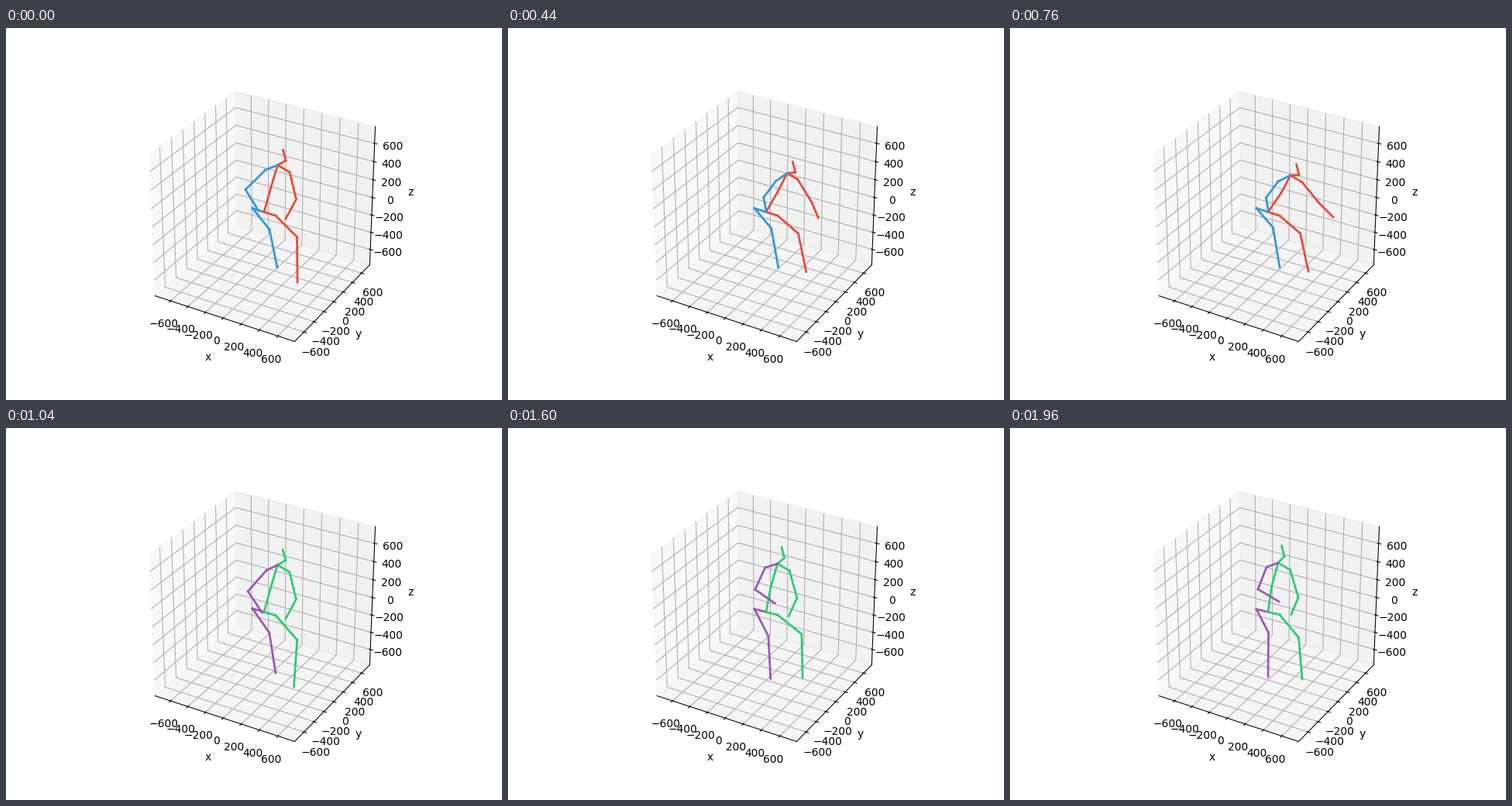
A matplotlib script that plays this animation: 640x480 px, repeating every 2000 ms.

```python
import numpy as np
import matplotlib.pyplot as plt
from matplotlib.animation import FuncAnimation

FRAMES, STEP = 50, 0.04          # frames per loop, seconds per frame
SWITCH = 1.0                     # second at which the predicted motion begins
REACH = 750                      # half width of the scene in mm
MM = 7.508                       # mm per stage pixel in the plane of the hip
HIP = np.array([333.0, 237.4])
HEAD = np.array([-3.5, -13.5])   # head as seen from the neck

plt.rcParams["axes.linewidth"] = 0.75

# Key poses as seen by the camera: hip, knee, foot / chest, neck / shoulder, elbow, wrist.
UPRIGHT = {
    "r_leg": [(318, 232.6), (340, 260), (350, 309)],
    "l_leg": [(375.5, 269.5), (376, 328)],
    "torso": [(350.5, 177), (361, 171)],
    "l_arm": [(366, 186), (374.5, 221), (361, 246)],
    "r_arm": [(335, 183), (309, 208.5), (326, 236)],
}
LEANING = {
    "r_leg": [(318, 232.6), (339.5, 257.5), (348, 309)],
    "l_leg": [(374.5, 265), (385, 314)],
    "torso": [(362, 190), (373, 189.5)],
    "l_arm": [(377, 199), (399, 226), (417, 244)],
    "r_arm": [(346, 198), (330.5, 219), (333.5, 237)],
}
STRIDING = {
    **UPRIGHT,
    "r_leg": [(318, 232.9), (340, 263.5), (348.5, 315)],
    "l_leg": [(375, 274.5), (370.5, 335)],
    "r_arm": [(336.5, 184), (311.5, 211), (329, 239.5)],
}
STANDING = {
    "r_leg": [(318, 233.9), (333.5, 264), (333, 321)],
    "l_leg": [(372.5, 270.5), (377, 324)],
    "torso": [(346, 174), (354, 165.5)],
    "l_arm": [(361.5, 183), (372, 218.5), (363, 240.5)],
    "r_arm": [(331, 179.5), (320, 208), (347, 224)],
}

# pace: ease-out power per part; sway: knee and foot shift at mid-motion;
# bow: sideways bend of the back at the end.
MEASURED = dict(start=UPRIGHT, end=LEANING, begin=0, length=0.76, bow=2.5, sway={},
                pace=dict(r_leg=1, l_leg=4, torso=2, l_arm=1.4, r_arm=4),
                left="#e74c3c", right="#3498db")
PREDICTED = dict(start=STRIDING, end=STANDING, begin=SWITCH, length=0.96, bow=-2,
                 sway=dict(r_leg=(0, 5), l_leg=(6, -6.5)),
                 pace=dict(r_leg=1, l_leg=1, torso=1, l_arm=1, r_arm=2),
                 left="#2ecc71", right="#9b59b6")


def pose(motion, t):
    """Chains of camera-plane joints at time t, as (is_right, points)."""
    s = min((t - motion["begin"]) / motion["length"], 1)
    part = {}
    for name, power in motion["pace"].items():
        a, b = np.array(motion["start"][name]), np.array(motion["end"][name])
        part[name] = a + (b - a) * (1 - (1 - s) ** power)
        shift = np.array(motion["sway"].get(name, (0, 0)))
        part[name][-2:] += shift * np.sin(np.pi * s)

    r_hip = part["r_leg"][0]
    chest, neck = part["torso"]
    back = (HIP + chest) / 2 + (motion["bow"] * s, -1)
    return [(True, [HIP, *part["r_leg"]]),
            (False, [HIP, 2 * HIP - r_hip, *part["l_leg"]]),
            (False, [HIP, back, chest, neck, neck + HEAD]),
            (False, [chest, *part["l_arm"]]),
            (True, [chest, *part["r_arm"]])]


def to_scene(points):
    """Place camera-plane points in the scene, at the depth of the hip."""
    elev, azim = np.radians([30, -60])
    right = np.array([-np.sin(azim), np.cos(azim), 0])
    up = np.array([-np.sin(elev) * np.cos(azim),
                   -np.sin(elev) * np.sin(azim), np.cos(elev)])
    dx, dy = ((np.array(points) - HIP) * MM).T
    return np.outer(dx, right) - np.outer(dy, up)


fig = plt.figure(figsize=(6.4, 4.8), dpi=100)
ax = fig.add_subplot(projection="3d")
ax.view_init(30, -60)
ax.set_box_aspect((1, 1, 1), zoom=0.946756)
edge = REACH * 25 / 24
for name in "xyz":
    ax.set(**{f"{name}lim": (-edge, edge),
              f"{name}ticks": range(-600, 601, 200),
              f"{name}label": name})

bone_count = sum(len(points) - 1 for _, points in pose(MEASURED, 0))
lines = [ax.plot([0, 0], [0, 0], [0, 0], lw=2)[0] for _ in range(bone_count)]


def draw(i):
    t = i * STEP
    motion = MEASURED if t < SWITCH else PREDICTED
    free = iter(lines)
    for is_right, points in pose(motion, t):
        joints = to_scene(points)
        for bone in zip(joints[:-1], joints[1:]):
            line = next(free)
            line.set_data_3d(*np.transpose(bone))
            line.set_color(motion["right" if is_right else "left"])
    return lines


anim = FuncAnimation(fig, draw, frames=FRAMES, interval=1000 * STEP,
                     repeat=True, repeat_delay=0)
plt.show()
```
